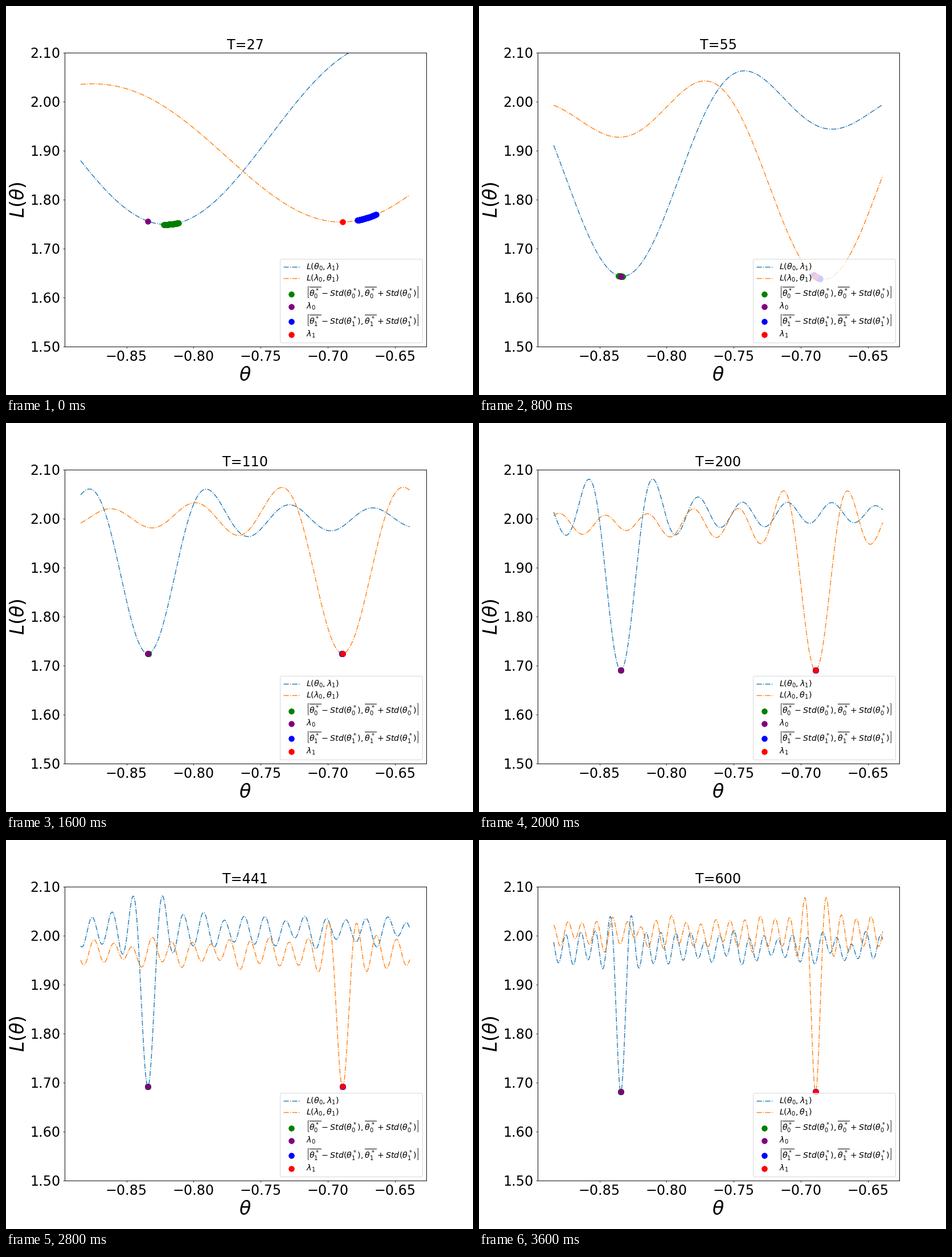
A matplotlib script for the animation above (4000 ms loop, 820 by 683 pixels).

```python
import numpy as np
import matplotlib.pyplot as plt
from matplotlib.animation import FuncAnimation

W, H = 820, 683
DPI = W / 12
LEFT, RIGHT = 0.125 * W, 0.9 * W


def theta(px):
    return -0.85 + (np.asarray(px) - 211.5) / 2357.5


LAM = theta([249, 591])
THETA = np.linspace(LAM[0] - 0.05, LAM[1] + 0.05, 1000)


def dip(low, base, rate, center, ripple=0, seed=0):
    """Sinc-shaped well with side lobes and a seeded ripple away from it."""
    rng = np.random.default_rng(seed)
    x = rate * (THETA - center)
    wave = -np.sin(np.abs(x))
    for f, p in zip(rng.uniform(0.3, 0.9, 3), rng.uniform(0, 2 * np.pi, 3)):
        wave += 0.3 * np.cos(f * x + p)
    far = x * x / (x * x + 200)
    return base - (base - low) * np.sinc(x / np.pi) + ripple * far * wave


scenes = []


def scene(T, low, base, speed, ripple=(0, 0), mins=(249, 591),
          bands=((249, 249), (591, 591))):
    low = np.broadcast_to(low, 2)
    curves = [dip(low[i], base[i], speed[i] * T, theta(mins[i]),
                  ripple[i], T + i) for i in (0, 1)]
    scenes.append((T, curves, bands))


scene(27, (1.749, 1.754), (2.057, 1.986), (1, 0.9),
      mins=(281, 588), bands=((277, 303), (617, 650)))
scene(40, 1.70, (2.02, 1.98), (0.95, 0.9),
      mins=(256, 597), bands=((252, 259), (592, 602)))
scene(55, (1.643, 1.637), (1.988, 1.97), (0.9, 0.92),
      mins=(252, 606), bands=((245, 252), (587.5, 598.5)))
scene(80, 1.68, (1.995, 1.99), (0.93, 0.92), (0.004, 0.004),
      bands=((247.5, 250.5), (590, 593)))
scene(110, 1.7245, (2.0, 2.003), (0.94, 0.905), (0.006, 0.006),
      bands=((249.4, 250.4), (589.6, 590.6)))
scene(200, 1.69, (2.01, 1.99), (0.95, 0.95), (0.012, 0.012))
scene(300, 1.6415, (2.012, 1.962), (0.99, 0.95), (0.025, 0.012))
scene(441, 1.6916, (2.01, 1.965), (0.94, 0.98), (0.02, 0.018))
scene(500, 1.6555, (1.97, 2.02), (0.98, 1), (0.018, 0.022))
scene(600, 1.681, (1.975, 2.005), (0.96, 0.95), (0.02, 0.02))

plt.rcParams["axes.linewidth"] = 1
fig, ax = plt.subplots(figsize=((W + 1e-6) / DPI, (H + 1e-6) / DPI), dpi=DPI)
fig.subplots_adjust(left=0.125, right=0.9, bottom=0.125, top=0.88)
ax.set_xlim(theta(LEFT), theta(RIGHT))
ax.set_ylim(1.5, 2.1)
ax.set_xticks(np.arange(-0.85, -0.64, 0.05))
ax.set_yticks(np.arange(1.5, 2.11, 0.1))
ax.xaxis.set_major_formatter(lambda v, _: f"{v:.2f}".replace("-", "\u2212"))
ax.yaxis.set_major_formatter("{x:.2f}")
ax.tick_params(labelsize=25)
ax.set_xlabel(r"$\theta$", fontsize=35)
ax.set_ylabel(r"$L(\theta)$", fontsize=35)


def dots(color, label):
    return ax.scatter([], [], s=100, color=color, label=label, zorder=3)


def band_label(i):
    mean, std = rf"\overline{{\theta_{i}^*}}", rf"Std(\theta_{i}^*)"
    return rf"$\left[{mean}-{std},{mean}+{std}\right]$"


lines = [ax.plot([], [], "-.", color=c, label=s)[0]
         for c, s in (("C0", r"$L(\theta_0,\lambda_1)$"),
                      ("C1", r"$L(\lambda_0,\theta_1)$"))]
bands, marks = [], []
for i, (band_color, mark_color) in enumerate((("green", "purple"),
                                              ("blue", "red"))):
    bands.append(dots(band_color, band_label(i)))
    marks.append(dots(mark_color, rf"$\lambda_{i}$"))
ax.legend(loc="lower right", fontsize=15, labelspacing=0.2)


def update(k):
    T, curves, spans = scenes[k]
    ax.set_title(f"T={T}", fontsize=25)
    for i, y in enumerate(curves):
        lines[i].set_data(THETA, y)
        xs = theta(np.linspace(*spans[i], 40))
        bands[i].set_offsets(np.c_[xs, np.interp(xs, THETA, y)])
        marks[i].set_offsets([[LAM[i], np.interp(LAM[i], THETA, y)]])
    return [*lines, *bands, *marks, ax.title]


anim = FuncAnimation(fig, update, frames=len(scenes), interval=400,
                     repeat=True, repeat_delay=0)
plt.show()
```
